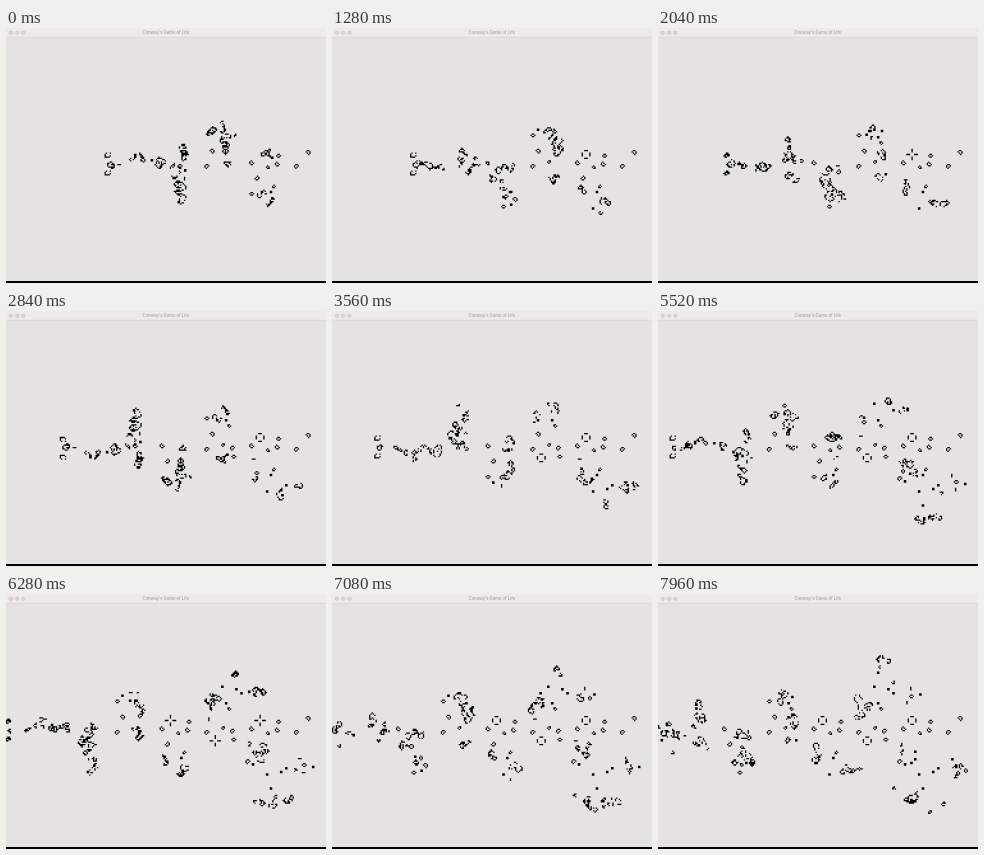
These frames come from a looping animation (320x255 px, 8000 ms). An HTML page with a canvas:

```html
<!DOCTYPE html>
<html lang="en">
<head>
<meta charset="utf-8">
<title>Game of Life</title>
<style>
  html, body { margin: 0; width: 100%; height: 100%; overflow: hidden; background: #e4e2e3; }
  canvas, svg { position: absolute; left: 0; top: 0; width: 320px; height: 255px; }
</style>
</head>
<body>
<canvas id="board" width="320" height="255"></canvas>
<svg viewBox="0 0 320 255">
  <rect width="320" height="9" fill="#f0e9e9"/>
  <rect y="8.8" width="320" height=".6" fill="#d6d0d1"/>
  <g fill="#dcd6d6" stroke="#bdb7b7" stroke-width=".5">
    <circle cx="4.8" cy="4.8" r="1.7"/>
    <circle cx="11.2" cy="4.8" r="1.7"/>
    <circle cx="17.4" cy="4.8" r="1.7"/>
  </g>
  <text x="159.8" y="6.4" text-anchor="middle" font-family="Inter, Roboto, sans-serif"
    font-size="4.2" font-weight="600" fill="#aea8a8">Conway's Game of Life</text>
  <rect y="253" width="320" height="2" fill="#000"/>
</svg>
<script>
const LOOP = 8000, STEP = 40.7, PHASE = 0.9;

// A 1000 x 796 window with a 28 px title bar and 4 px cells, scaled to 320 x 253.
const CELL_W = 4 * 320 / 1000, CELL_H = 4 * 253 / 796, TOP = 28 * 253 / 796;
const VISIBLE_COLS = 250, W = 320, H = 192;   // W leaves a margin; rows run 1..H
const FRONT_COL = 77, SHIP_ROW = 91;          // puffer position when the loop begins

// Puffer train heading left: two lightweight spaceships around a B-heptomino.
const SHIP = ['.O...', 'O....', 'O...O', 'OOOO.'];
const PUFFER = [...SHIP, '', '', '', '....O', '..OO.', '..O..', '..O..', '...O.', '', '', ...SHIP];

// A few places that hold cells when the loop begins: settled debris, then moving parts.
const LANDMARKS = [
  [302, 124.5], [290, 138.5], [272, 128.5], [251, 150.5], [245, 135.5], [206, 123.5], [200, 138.5],
  [102, 127.5], [102, 145.5], [104, 137.5], [113, 137.5], [137, 129.5],
  [178, 126.5], [174, 155.5], [220, 124.5], [216, 96.5], [264, 178.5]
];

const NEIGHBOURS = [-W - 1, -W, -W + 1, -1, 1, W - 1, W, W + 1];
const counts = new Uint8Array(W * (H + 2));
const alive = new Uint8Array(W * (H + 2));

const cellX = col => col * CELL_W;
const cellY = row => TOP + (row - 1) * CELL_H;

function nextGeneration(live, right) {
  const touched = [];
  for (const i of live) {
    alive[i] = 1;
    for (const d of NEIGHBOURS) if (!counts[i + d]++) touched.push(i + d);
  }
  const born = touched.filter(j =>
    (counts[j] === 3 || (counts[j] === 2 && alive[j])) &&
    j % W < right && j >= W && j < W * (H + 1));
  for (const j of touched) counts[j] = 0;
  for (const i of live) alive[i] = 0;
  return born;
}

function seed({ flip, col, row }) {
  const rows = flip ? [...PUFFER].reverse() : PUFFER;
  return rows.flatMap((line, r) =>
    [...line].flatMap((ch, c) => ch === 'O' ? [(row + r) * W + col + c] : []));
}

// How close each cell lies to the landmarks.
function buildHeat() {
  return Float32Array.from({ length: W * (H + 2) }, (_, i) => {
    const x = cellX(i % W + 0.5), y = cellY(Math.floor(i / W) + 0.5);
    return LANDMARKS.reduce((sum, [px, py]) =>
      sum + Math.exp(-((x - px) ** 2 + (y - py) ** 2) / 5), 0);
  });
}

function score(live, heat, shift) {
  let sum = 0, n = 0;
  for (const i of live) {
    if (i % W >= VISIBLE_COLS) continue;
    sum += heat[i + shift * W] || 0;
    n++;
  }
  return sum / Math.sqrt(n || 1);
}

// Choose the launch point and age whose debris lies on the landmarks.
function findLaunch() {
  const heat = buildHeat();
  let best = { score: -1 };
  for (const right of [VISIBLE_COLS, 300]) {
    for (const flip of [false, true]) {
      for (let col = 220; col <= 256 && col + 5 <= right; col++) {
        const age = 2 * (col - FRONT_COL);   // the train moves one cell in two generations
        let live = seed({ flip, col, row: SHIP_ROW });
        for (let g = 0; g <= age + 4; g++) {
          if (g >= age - 4 && g % 2 === 0) {
            for (let shift = -3; shift <= 3; shift++) {
              const s = score(live, heat, shift);
              if (s > best.score) best = { score: s, right, flip, col, row: SHIP_ROW + shift, age: g };
            }
          }
          live = nextGeneration(live, right);
        }
      }
    }
  }
  return best;
}

function recordGenerations() {
  const launch = findLaunch();
  const total = Math.floor(LOOP / STEP + PHASE) + 1;
  const history = [];
  let live = seed(launch);
  for (let g = 0; g < launch.age + total; g++) {
    if (g >= launch.age) history.push(live);
    live = nextGeneration(live, launch.right);
  }
  return history;
}

const history = recordGenerations();
const ctx = document.getElementById('board').getContext('2d');
let shown = -1;

function draw(live) {
  ctx.fillStyle = '#e4e2e3';
  ctx.fillRect(0, 0, 320, 255);
  ctx.fillStyle = '#000';
  ctx.beginPath();
  for (const i of live) ctx.rect(cellX(i % W), cellY(Math.floor(i / W)), CELL_W, CELL_H);
  ctx.fill();
}

const start = performance.now();

function tick() {
  const time = (performance.now() - start) % LOOP;
  const generation = Math.floor(time / STEP + PHASE);
  if (generation !== shown) draw(history[shown = generation]);
  requestAnimationFrame(tick);
}
tick();
</script>
</body>
</html>
```
